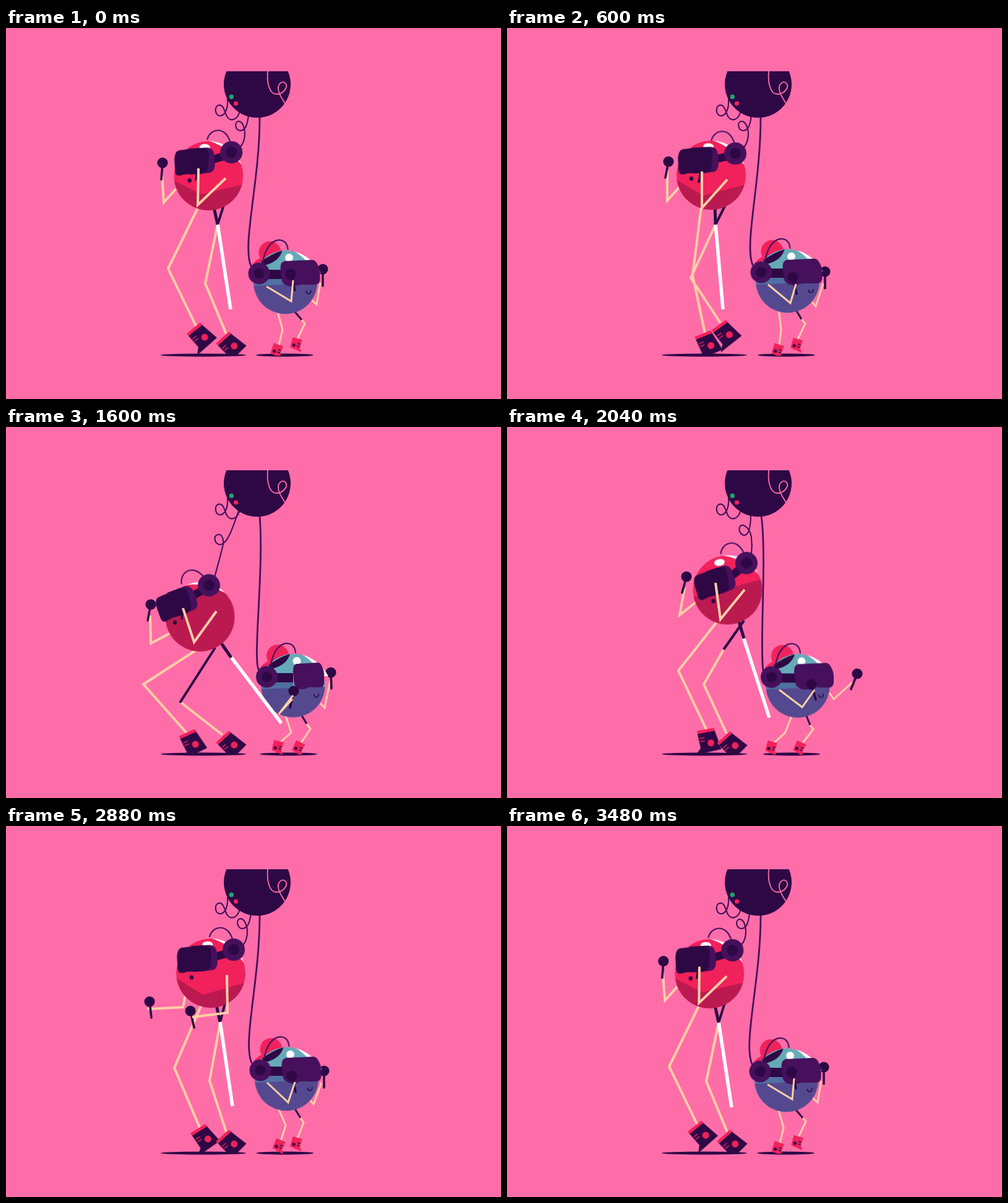
Write an HTML page without scripts that moves like this. It is 800 px wide and 600 px high and loops after 3.52 s.

```html
<!DOCTYPE html>
<html lang="en">
<head>
<meta charset="utf-8">
<title>VR dancers</title>
<style>
  html, body { margin: 0; width: 100%; height: 100%; overflow: hidden; background: #ff6da9; }
  svg { display: block; width: 800px; height: 600px; }
  :root { --dark: #2e0845; --plum: #46105c; --red: #f1215b; --crimson: #bb1a50; --skin: #ffcfa6; }

  /* Every moving part lists its own poses --a to --f; --x and --y are extra accents. */
  .bend, .jab, .move { animation: 3.52s ease-in-out infinite; }
  .bend { animation-name: bend; }
  .jab { animation-name: jab; }
  .move { animation-name: move; }
  @keyframes bend {
    0%, to { d: var(--a) } 17.05% { d: var(--b) } 32.95% { d: var(--c) }
    45.45% { d: var(--d) } 57.95% { d: var(--e) } 81.82% { d: var(--f) }
  }
  @keyframes jab {
    0%, to { d: var(--a) } 17.05% { d: var(--b) } 32.95% { d: var(--c) }
    45.45% { d: var(--d) } 48.3% { d: var(--x); animation-timing-function: ease-out }
    57.95% { d: var(--e) } 68.2% { d: var(--y) } 81.82% { d: var(--f) }
  }
  @keyframes move {
    0%, to { transform: var(--a) } 17.05% { transform: var(--b) } 32.95% { transform: var(--c) }
    45.45% { transform: var(--d) } 57.95% { transform: var(--e) } 81.82% { transform: var(--f) }
  }

  .line { fill: none; stroke: var(--skin); stroke-width: 4; }
  .thin { stroke-width: 3; }
  .cloth { stroke: var(--dark); }
  .wire { fill: none; stroke: var(--plum); stroke-width: 2.2; stroke-linecap: round; }
  .cord { stroke-width: 2.8; }
  .mitt { fill: none; stroke: var(--dark); stroke-width: 3.6; stroke-linecap: round; marker-start: url(#knob); }
  .dark { fill: var(--dark); }
  .plum { fill: var(--plum); }
  .red { fill: var(--red); }
  .crimson { fill: var(--crimson); }
  .white { fill: #fff; }
</style>
</head>
<body>
<svg viewBox="0 0 800 600">
  <defs>
    <marker id="knob" markerUnits="userSpaceOnUse" markerWidth="20" markerHeight="20" refX="10" refY="10">
      <circle class="dark" cx="10" cy="10" r="8.6"/>
    </marker>
    <clipPath id="big"><circle r="56"/></clipPath>
    <clipPath id="small"><circle r="51.5"/></clipPath>
    <clipPath id="ground"><path d="M0 0H800V529.5H0Z"/></clipPath>
    <g id="boot">
      <path class="dark" d="M-14 0H14L20 34 -23 36 -13 27Z"/>
      <path class="red" d="M-14 -2H14L15 3H-14Z"/>
      <circle class="red" cx="5" cy="21" r="5.5"/>
      <path d="M-12 11H-4M-12 16H-4" stroke="#f1215b" stroke-width="1.6"/>
    </g>
    <g id="shoe">
      <path class="red" d="M-8 -1H8L7 12 12 19 -8 16Z"/>
      <circle class="dark" cx="-3" cy="11" r="2.6"/>
      <path d="M2 7H7M2 11H7" stroke="#2e0845" stroke-width="1.6"/>
    </g>
  </defs>

  <!-- shadows -->
  <ellipse class="dark" cx="319" cy="529" rx="69" ry="2.4"/>
  <ellipse class="dark move" cy="529" rx="46.5" ry="2.4"
    style="--a:translate(450.5px);--b:translate(451.5px);--c:translate(452.5px);--d:translate(456.5px);--e:translate(460px);--f:translate(451px)"/>

  <!-- cables and machine -->
  <path class="wire cord bend" style="--a:path('M410 144C410 250 381 350 396 385');--b:path('M410 144C410 250 383 350 397 383');--c:path('M410 144C412 230 386 350 401 384');--d:path('M410 144C417 230 399 370 408 392');--e:path('M411 144C420 210 408 350 414 394');--f:path('M410 144C410 250 382 350 397 383')"/>
  <path class="wire bend" style="
    --a:path('M392 140C390 160 386 165 379 166C371 166 368 153 375 151C383 150 386 163 386 170C386 180 383 188 378 193');
    --b:path('M395 140C393 160 389 165 382 166C374 166 371 153 378 151C386 150 390 163 390 170C390 180 387 188 383 193');
    --c:path('M396 140C394 160 389 165 382 166C374 166 371 152 378 150C386 149 390 163 390 170C390 180 387 188 383 193');
    --d:path('M376 136C368 156 360 188 347 190C337 191 334 176 342 174C350 172 353 184 350 194C347 206 342 225 337 243');
    --e:path('M394 140C394 160 391 174 384 175C376 175 372 162 379 159C387 157 394 170 395 179C396 188 396 196 395 204');
    --f:path('M396 140C394 160 389 165 382 166C374 166 371 152 378 150C386 149 390 163 390 170C390 180 387 188 383 193')"/>
  <path class="wire" d="M358 116C359 132 353 142 346 142C338 142 336 128 343 125C351 122 353 134 357 143C363 152 373 149 377 137"/>
  <path class="dark" d="M356.300 70A54 54 0 1 0 455.700 70Z"/>
  <circle cx="364.300" cy="111.300" r="3.700" fill="#1fa56f"/>
  <circle class="red" cx="371.500" cy="122" r="3.600"/>
  <path d="M423 70C421 92 427 107 437 107C449 107 456 95 452 90C447 84 439 90 440 99C441 108 446 114 451 122" fill="none" stroke="#ff6da9" stroke-width="1.800"/>

  <!-- small dancer -->
  <path class="line thin jab" style="--a:path('M494 440L502 447 508 412');--b:path('M493 443L499 450 511 413');--c:path('M494 448L500 455 514 413');--d:path('M508 447L515 454 524 410');--x:path('M519 432L531 442 562 408');--e:path('M521 430L528 440 558 413');--y:path('M518 428L531 437 572 403');--f:path('M491 443L497 450 510 415')"/>
  <path class="line thin bend" style="--a:path('M438 456L447 488 441 513');--b:path('M439 454L443 488 440 514');--c:path('M446 456L456 487 443 510');--d:path('M450 462L461 494 442 511');--e:path('M462 463L449 495 430 512');--f:path('M439 454L452 484 444 510')"/>
  <path class="line thin bend" style="--a:path('M478 472L483 478 471 503');--b:path('M476 471L482 478 470 503');--c:path('M481 474L485 486 473 511');--d:path('M486 480L492 488 476 512');--e:path('M490 482L495 489 477 512');--f:path('M476 472L481 480 471 505')"/>
  <path class="line thin cloth bend" style="--a:path('M466 458L478 472');--b:path('M467 456L476 471');--c:path('M474 458L481 474');--d:path('M477 465L486 480');--e:path('M483 465L490 482');--f:path('M466 456L476 472')"/>
  <g clip-path="url(#ground)">
    <use href="#shoe" class="move" style="--a:translate(440px,513px) rotate(18deg);--b:translate(440px,513px) rotate(18deg);--c:translate(441px,509px) rotate(15deg);--d:translate(441px,509px) rotate(15deg);--e:translate(429px,510px) rotate(15deg);--f:translate(444px,509px) rotate(22deg)"/>
    <use href="#shoe" class="move" style="--a:translate(471px,503px) rotate(15deg);--b:translate(470px,504px) rotate(15deg);--c:translate(473px,510px) rotate(12deg);--d:translate(476px,511px) rotate(25deg);--e:translate(476px,511px) rotate(25deg);--f:translate(471px,505px) rotate(15deg)"/>
  </g>
  <path class="mitt jab" style="--a:path('M512 390L512 417');--b:path('M514 394L514 421');--c:path('M517 400L517 427');--d:path('M525 397L526 423');--x:path('M571 395L560 421');--e:path('M566 399L556 424');--y:path('M581 392L571 418');--f:path('M514 396L514 423')"/>
  <g class="move" style="--a:translate(451.5px,411px);--b:translate(453.5px,409px);--c:translate(456px,411.5px);--d:translate(464px,418px);--e:translate(470px,418.5px);--f:translate(453.5px,409px)">
    <circle class="red" cx="-25" cy="-48" r="18"/>
    <path class="red" d="M-36 -34L-54 -26Q-52 -33 -41 -39Z"/>
    <g clip-path="url(#small)">
      <circle r="51.5" fill="#66aab8"/>
      <path d="M-52 -5H0V10H-52Z" fill="#5070a2"/>
      <path d="M-54 6L-5 4 54 2V54H-54Z" fill="#54498f"/>
    </g>
    <path class="white" d="M15 -49.500Q42 -42 57 -15H46Q35 -38 15 -49.500Z"/>
    <path class="dark" d="M-5 -51Q-20 -47 -40 -33L-34 -27Q-10 -33 -5 -51Z"/>
    <circle class="white" cx="6" cy="-39.500" r="6.500"/>
    <path class="wire" d="M-36 -33C-30 -74 2 -77 4 -53"/>
    <path class="dark" d="M-30 -20H0V-5H-30Z"/>
    <circle class="plum" cx="-42.500" cy="-14" r="17.500"/>
    <circle class="dark" cx="-42.500" cy="-14" r="8.500"/>
    <path class="plum move" d="M-26 -20L18 -22Q22 -22 25 -18Q31 -9 31 0V9Q31 18 22 18H8Q-2 17 -10 21Q-29 22 -31 10L-33 -8Q-33 -19 -26 -20Z"
      style="--a:translate(25px,-14px) scale(1);--b:translate(25px,-14px) scale(1);--c:translate(24px,-14px) scale(1);--d:translate(26px,-15px) scale(.79,1);--e:translate(27px,-15px) scale(1);--f:translate(25px,-14px) scale(1)"/>
    <path d="M34 14Q34 19 38 19Q42 18 41 13" fill="none" stroke="#2e0845" stroke-width="1.700"/>
  </g>
  <path class="mitt bend" style="--a:path('M460 398L467 424');--b:path('M462 403L468 430');--c:path('M466 408L472 433');--d:path('M465 427L459 454');--e:path('M492 416L499 441');--f:path('M462 404L468 430')"/>
  <path class="line thin bend" style="--a:path('M421 418L461 442 464 408');--b:path('M422 415L458 445 467 414');--c:path('M425 417L459 449 470 418');--d:path('M463 440L441 464 464 434');--e:path('M440 425L477 453 497 425');--f:path('M422 415L456 447 467 414')"/>

  <!-- tall dancer -->
  <path class="line bend" style="--a:path('M275 260L255 282 252 238');--b:path('M278 258L259 279 259 230');--c:path('M286 270L280 290 268 240');--d:path('M268 332L234 350 233 305');--e:path('M307 282L279 304 287 260');--f:path('M290 273L286 293 228 296')"/>
  <path class="mitt bend" style="--a:path('M253 218L251 245');--b:path('M261 216L256 242');--c:path('M269 228L263 254');--d:path('M234 287L229 313');--e:path('M290 242L283 268');--f:path('M232 284L235 310')"/>
  <path class="line bend" style="--a:path('M342 318L322 413 356 495');--b:path('M337 318L297 404 345 477');--c:path('M338 316L300 405 348 481');--d:path('M282 445L282 445 350 498');--e:path('M350 360L318 416 355 496');--f:path('M346 318L329 412 356 495')"/>
  <path class="line cloth bend" style="--a:path('M352 286L342 318');--b:path('M353 286L337 318');--c:path('M352 285L338 316');--d:path('M338 357L281 446');--e:path('M383 313L350 360');--f:path('M354 286L346 318')"/>
  <path class="line bend" style="stroke:#fff;stroke-width:5.5;--a:path('M342 317L363 455');--b:path('M337 317L349 455');--c:path('M338 316L351 453');--d:path('M363 371L445 479');--e:path('M382 340L424 470');--f:path('M346 316L366 453')"/>
  <path class="line cloth bend" style="stroke-width:5;--a:path('M336 290L342 318');--b:path('M336 288L337 318');--c:path('M335 286L338 316');--d:path('M344 344L364 373');--e:path('M374 312L383 342');--f:path('M340 290L346 317')"/>
  <path class="line jab" style="--a:path('M311 289L262 389 309 486');--b:path('M314 288L300 400 320 494');--c:path('M314 287L285 393 318 492');--d:path('M307 361L222 416 292 495');--x:path('M310 357L207 414 295 495');--e:path('M340 314L277 394 323 491');--y:path('M331 306L275 393 319 491');--f:path('M316 289L272 391 314 490')"/>
  <g clip-path="url(#ground)">
    <use href="#boot" class="move" style="--a:translate(304px,487px) rotate(-39deg);--b:translate(317px,496px) rotate(-22deg);--c:translate(316px,495px) rotate(-23deg);--d:translate(293px,496px) rotate(-24deg);--e:translate(321px,491px) rotate(-10deg);--f:translate(311px,491px) rotate(-32deg)"/>
    <use href="#boot" class="move" style="--a:translate(351px,502px) rotate(-42deg);--b:translate(343px,482px) rotate(-36deg);--c:translate(345px,484px) rotate(-36deg);--d:translate(351px,502px) rotate(-42deg);--e:translate(351px,503px) rotate(-42deg);--f:translate(351px,502px) rotate(-42deg)"/>
  </g>
  <g class="move" style="--a:translate(327.3px,239px);--b:translate(330px,238px);--c:translate(329.5px,236.5px);--d:translate(313.5px,307px);--e:translate(356.5px,263.5px);--f:translate(331px,238px)">
    <g clip-path="url(#big)">
      <circle class="red" r="56"/>
      <path class="crimson bend" style="--a:path('M-57 7L-12 30 57 14V60H-57Z');--b:path('M-57 7L-13 33 57 15V60H-57Z');--c:path('M-57 9L-12 37 57 17V60H-57Z');--d:path('M-57 -20L-10 -42 57 -48V60H-57Z');--e:path('M-57 12L-10 1 57 -18V60H-57Z');--f:path('M-57 7L-13 35 57 15V60H-57Z')"/>
      <g class="move" style="--a:rotate(0deg);--b:rotate(2deg);--c:rotate(2deg);--d:rotate(-25deg);--e:rotate(-9deg);--f:rotate(1deg)">
        <path class="white" d="M-2 -57Q28 -50 54 -17L60 -60Z"/>
        <ellipse class="white" cx="-6" cy="-46" rx="8.500" ry="5.500"/>
      </g>
    </g>
    <ellipse class="dark move" rx="3.200" ry="3.600" style="--a:translate(-30.5px,7.5px);--b:translate(-32px,5.5px);--c:translate(-31.5px,5.5px);--d:translate(-40.5px,9px);--e:translate(-23px,18px);--f:translate(-31px,7px)"/>
    <path class="line cloth bend" style="stroke-width:13;--a:path('M-2 -24L37 -35');--b:path('M-2 -24L39 -33');--c:path('M-2 -24L39 -33');--d:path('M-20 -30L14 -48');--e:path('M0 -18L30 -41');--f:path('M-2 -24L37 -35')"/>
    <g class="move" style="--a:translate(-23px,-23.5px) rotate(-3deg);--b:translate(-21.5px,-24px) rotate(-2deg);--c:translate(-21.5px,-24px) rotate(-2deg);--d:translate(-38.5px,-22px) rotate(-20deg);--e:translate(-21.5px,-12.5px) rotate(-17deg);--f:translate(-22.5px,-23.5px) rotate(-3deg)">
      <path class="plum" d="M-8 -21H22Q32 -20 33 -8V8Q32 19 23 20L0 21Z"/>
      <path class="dark" d="M-23 -19Q-31 -18 -32 -4V12Q-33 22 -25 22Q-13 19 -6 21H9Q20 21 22 10L24 -10Q24 -21 12 -21Z"/>
    </g>
    <g class="move" style="--a:translate(37px,-38px) rotate(0deg);--b:translate(39px,-35px) rotate(1deg);--c:translate(39px,-35px) rotate(1deg);--d:translate(14.5px,-51px) rotate(-25deg);--e:translate(30.5px,-43.5px) rotate(-8deg);--f:translate(37px,-38px) rotate(0deg)">
      <path class="wire" d="M-39 -21C-34 -39 -10 -43 -2 -17"/>
      <circle class="plum" r="18"/>
      <circle class="dark" r="9"/>
    </g>
  </g>
  <path class="mitt bend" style="--a:path('M311 221L307 245');--b:path('M315 224L310 249');--c:path('M319 241L312 267');--d:path('M285 284L284 310');--e:path('M335 246L335 268');--f:path('M298 299L304 326')"/>
  <path class="line bend" style="--a:path('M355 243L310 286 311 227');--b:path('M356 245L315 291 315 232');--c:path('M355 241L343 302 317 248');--d:path('M340 298L304 348 286 293');--e:path('M384 263L345 311 337 252');--f:path('M357 241L358 302 301 309')"/>
</svg>
</body>
</html>
```
